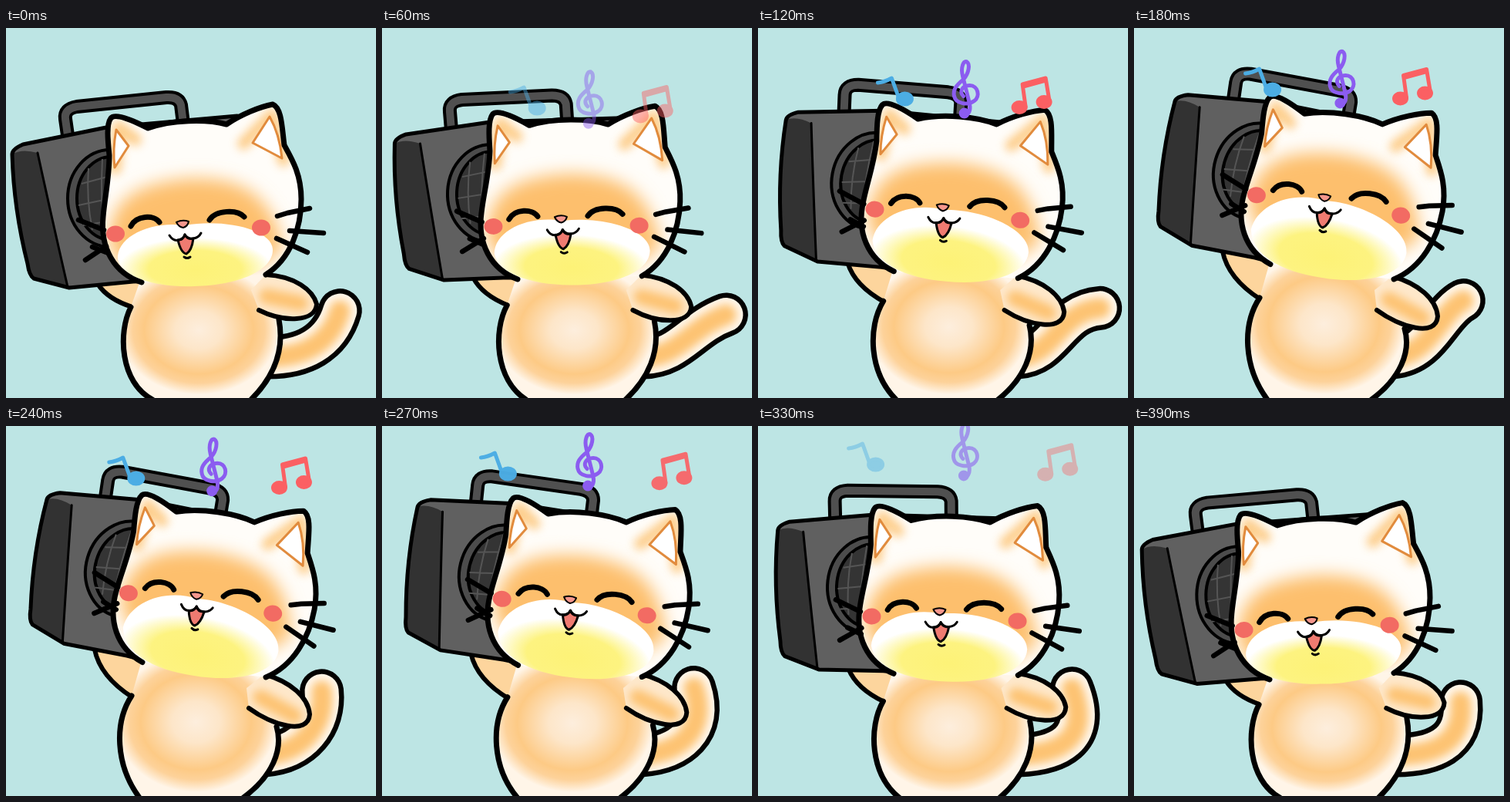
An HTML page for the animation above (420 ms loop, 480 px wide and 480 px high).

```html
<!DOCTYPE html>
<html lang="en">
<head>
<meta charset="utf-8">
<title>Cat with boombox</title>
<style>
  html, body { margin: 0; height: 100%; overflow: hidden; background: #bde5e4; }
  svg { display: block; width: 100vw; height: 100vh; }
  .line { fill: none; stroke: #000; stroke-linecap: round; stroke-linejoin: round; }
  .soft { fill: none; stroke: #fdc372; stroke-linecap: round; stroke-linejoin: round; filter: url(#blur); }
</style>
</head>
<body>
<svg viewBox="0 0 480 480">
  <defs>
    <filter id="blur" filterUnits="userSpaceOnUse" x="0" y="0" width="480" height="520"><feGaussianBlur stdDeviation="6"/></filter>
    <filter id="haze" filterUnits="userSpaceOnUse" x="0" y="0" width="480" height="480"><feGaussianBlur stdDeviation="11"/></filter>
    <radialGradient id="belly" cx=".48" cy=".45" r=".6">
      <stop stop-color="#fdeedd"/><stop offset=".25" stop-color="#fde6c9"/>
      <stop offset=".58" stop-color="#fdca85"/><stop offset=".7" stop-color="#fdd29a"/><stop offset=".85" stop-color="#fff5e8"/>
    </radialGradient>
    <radialGradient id="chin" cy=".73">
      <stop stop-color="#fdf277"/><stop offset=".6" stop-color="#fdf380"/><stop offset="1" stop-color="#fff"/>
    </radialGradient>
    <clipPath id="inHead"><use href="#headShape"/></clipPath>
    <clipPath id="inBox"><use href="#boxShape"/></clipPath>
  </defs>

  <g class="line">
    <path class="tail" stroke-width="57"/>
    <path class="tail" stroke="#fff8ee" stroke-width="44"/>
    <path class="tail soft" stroke-width="27"/>
  </g>

  <path fill="#fdd59d" d="M176 330L118 328Q128 350 164 362L190 362Z" data-to="M176 305L113 285Q118 320 164 352L190 352Z"/>
  <path class="line" stroke-width="6" d="M119 332Q132 352 164 362" data-to="M115 290Q122 325 164 352"/>

  <g id="box">
    <g class="line" stroke-width="18">
      <path id="handle" d="M80 139L77 118Q75 105 92 102L208 90Q224 89 227 100L230 124"/>
      <use href="#handle" stroke="#505050" stroke-width="10"/>
    </g>
    <path id="boxShape" fill="#606060" d="M8 164Q8 157 22 151L130 129L300 114V325L165 329L82 337L36 325Q30 321 28 306Q10 235 8 164Z"/>
    <path fill="#323232" d="M8 164Q20 156 41 162Q58 240 80 336L36 325Q30 321 28 306Q10 235 8 164Z"/>
    <path class="line" stroke-width="3" d="M41 162Q58 240 80 336"/>
    <g clip-path="url(#inBox)" stroke="#000" stroke-width="4">
      <ellipse cx="135" cy="221" rx="55" ry="63" fill="#4c4c4c"/>
      <ellipse cx="137" cy="221" rx="45" ry="54" fill="#343434"/>
      <path stroke="#555" stroke-width="2" fill="none" d="M98 202L150 188M94 230L150 218M100 256L150 248M107 182Q104 222 112 262M125 170Q122 222 128 274"/>
    </g>
    <use href="#boxShape" class="line" style="fill-opacity:0" stroke-width="5"/>
  </g>

  <path fill="url(#belly)" d="M176 322L162 362C145 395 148 460 190 482L318 482C345 455 362 420 354 376L337 318Z"
    data-to="M176 304L163 350C140 385 142 440 173 482L308 482C345 455 360 420 351 388L337 318Z"/>
  <path class="line" stroke-width="7" d="M162 362C145 395 148 460 190 482M318 482C345 455 362 420 354 378"
    data-to="M163 350C140 385 142 440 173 482M308 482C345 455 360 420 351 390"/>

  <path fill="#fee8cb" d="M337 320C375 322 398 340 403 358C402 382 360 382 328 366L318 340Z"
    data-to="M335 322C370 332 392 352 394 374C392 402 345 388 315 366L312 340Z"/>
  <path class="soft" stroke-width="20" d="M338 348L382 357" data-to="M330 352L374 376"/>
  <path class="line" stroke-width="6" d="M337 320C375 322 398 340 403 358C402 382 360 382 328 366"
    data-to="M335 322C370 332 392 352 394 374C392 402 345 388 315 366"/>

  <g id="head">
    <path id="headShape" fill="#fffdf9" d="M176 330C140 318 122 285 126 245C128 220 134 195 134 165C132 145 130 125 136 117C142 110 165 120 184 130C215 119 260 118 286 125C305 112 330 102 346 99C358 104 358 130 361 152C371 170 383 190 383 222C383 258 370 299 337 320"/>
    <g clip-path="url(#inHead)">
      <path class="soft" stroke-width="16" opacity=".8" d="M142 182L146 128L168 145M308 150L345 112L360 172"/>
      <g class="face">
        <path fill="#fdbf6d" filter="url(#haze)" d="M134 282C132 225 165 201 240 195C315 194 345 222 360 285L330 310L150 310Z"/>
      </g>
    </g>
    <path fill="url(#chin)" d="M145 300C143 272 185 250 232 256C285 247 345 262 346 287C347 315 300 334 245 335C190 337 150 322 145 300Z"
      data-to="M143 290C146 254 190 230 232 236C275 230 345 250 347 284C347 315 300 334 245 335C190 337 150 322 143 290Z"/>
    <use href="#headShape" class="line" style="fill-opacity:0" stroke-width="7"/>
    <path fill="#fff" stroke="#e18b3d" stroke-width="3" stroke-linejoin="round" d="M143 132L159 153L141 181Q138 158 143 132ZM342 115L320 149L358 169Q355 138 342 115Z"/>
    <g class="face">
      <g fill="#f26b63"><ellipse cx="142" cy="267" rx="12" ry="10.5"/><ellipse cx="331" cy="259" rx="12" ry="10.5"/></g>
      <path class="line" stroke-width="7" d="M162 257C169 243 192 242 199 252M264 249C272 236 300 235 309 245"/>
      <path class="line" stroke-width="6.5" d="M352 244L365 240L394 234M368 263L412 266M351 273L391 291M94 249L127 262M112 284L130 291M103 301L130 283"/>
      <path class="line" stroke-width="2" style="fill:#f5978d" d="M221 252Q229 248 237 251Q236 257 230 259Q224 258 221 252Z"/>
      <path class="line" stroke-width="3" style="fill:#ef7b71" d="M223 275Q227 292 234 293Q241 289 243 273Q235 275 232 268Q229 276 223 275Z"/>
      <path class="line" stroke-width="3" d="M212 269Q217 277 224 275Q231 273 232 268Q236 274 243 273Q250 272 253 266M231 297Q235 300 239 297"/>
    </g>
  </g>

  <g class="line" stroke-width="5">
    <g id="quaver" style="stroke:#4cade4">
      <path d="M-8 -2L-17 -27Q-26 -22 -35 -21"/><ellipse rx="9" ry="7" fill="#4cade4"/>
    </g>
    <g id="clef" style="stroke:#8b5cf0">
      <path d="M0 72Q8 70 6 58L-3 22C-6 10 -2 2 2 3C7 6 5 18 -2 26C-12 34 -16 40 -14 48C-12 58 4 60 12 54C20 48 17 34 6 34C-4 34 -8 42 -2 48"/>
      <circle cx="-1" cy="70" r="4.5" fill="#8b5cf0"/>
    </g>
    <g id="beamed" style="stroke:#fb6063">
      <path d="M8 -1L4 -30L34 -38L39 -8M5 -27L34 -35"/>
      <ellipse rx="8" ry="6.5" fill="#fb6063"/><ellipse cx="32" cy="-7" rx="8" ry="6.5" fill="#fb6063"/>
    </g>
  </g>
</svg>
<script>
  const $ = id => document.getElementById(id);
  const all = selector => [...document.querySelectorAll(selector)];
  const clamp = v => Math.max(0, Math.min(1, v));
  const numbers = /[\d.]+/g;
  const morphs = all('[data-to]').map(el => ({ el, from: el.getAttribute('d'), to: el.dataset.to.match(numbers) }));
  const faces = all('.face'), tails = all('.tail');
  const STEP = 30, STEPS = 14;

  function place(id, dx, dy, angle, cx, cy) {
    $(id).setAttribute('transform', `translate(${dx} ${dy}) rotate(${angle} ${cx} ${cy})`);
  }

  function note(id, x, y, step, fade) {
    $(id).setAttribute('transform', `translate(${x} ${y})`);
    $(id).setAttribute('opacity', Math.min(clamp((step - .9) * .42), clamp((12.5 - step) * fade)));
  }

  // The handle is stroked twice, so its own copy must inherit width and colour.
  function draw(now) {
    const step = Math.floor(now / STEP) % STEPS;
    const turn = 2 * Math.PI / STEPS;
    const sway = (1 - Math.cos(step * turn)) / 2;
    const bend = Math.sin((step - .5) * turn);
    const blend = sway / .95;

    for (const { el, from, to } of morphs) {
      let i = 0;
      el.setAttribute('d', from.replace(numbers, n => +n + (to[i++] - n) * blend));
    }
    place('head', 42.6 * sway, -8.4 * sway, 11 * sway, 241, 106);
    place('box', 32.4 * sway, -51 * sway, 17.3 * sway, 85, 203);
    faces.forEach(f => f.setAttribute('transform', `translate(0 ${-22 * blend})`));

    const x = 438 - 25 * sway + 21 * bend;
    const y = 370 - 24 * sway + 14 * bend - 6 * bend * bend;
    const pullX = x - 22 + 18 * sway - 42 * bend;
    const pullY = y + 36 - 32 * bend;
    const curve = `M${340 - 5 * sway} 427C385 ${427 - 4 * sway} ${pullX} ${pullY} ${x} ${y}`;
    tails.forEach(t => t.setAttribute('d', curve));

    note('quaver', 212 - 5.4 * step, 116 - 6 * step, step, .28);
    note('clef', 269 - .1 * step, 67 - 6.6 * step, step, .38);
    note('beamed', 334 + .32 * step * step, 126 - 5.75 * step, step, .26);
  }

  function tick() {
    draw(performance.now());
    requestAnimationFrame(tick);
  }
  tick();
</script>
</body>
</html>
```
